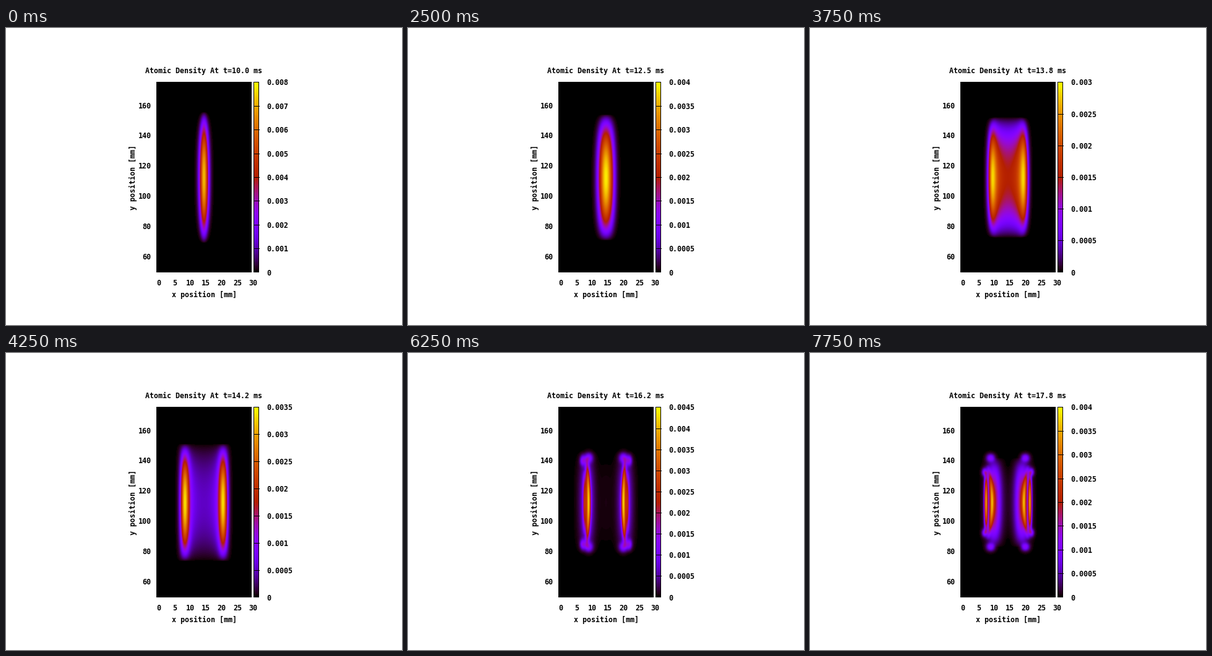
These frames come from a looping animation (640 px wide and 480 px high, 8 s). A matplotlib script:

```python
import numpy as np
import matplotlib.pyplot as plt
from matplotlib.animation import FuncAnimation

W, H = 640, 480
FRAMES, INTERVAL = 32, 250
SPLIT = 17  # step at which the cloud has become two lobes
LEFT, RIGHT, TOP, BOTTOM = 243, 397, 87, 395
MID_X, MID_Y = 319.5, 241.0

plt.rcParams.update({
    "font.family": "DejaVu Sans Mono",
    "font.weight": "bold",
    "font.size": 11.63 * 0.72,
})

# Distances from the centre of the cloud, in pixels
U = np.abs(np.arange(LEFT, RIGHT) - MID_X)[None, :]
V = np.abs(np.arange(TOP, BOTTOM) - MID_Y)[:, None]


def bell(x, width):
    return np.exp(-0.5 * (x / width) ** 2)


def dome(half):
    return np.clip(1 - (V / half) ** 2, 0, None)


def single_cloud(i):
    """Atoms pushed outwards until they pile up at the two walls."""
    s = i / SPLIT
    gain = np.exp(3.1 * s ** 3)
    wall = 24 + 8 * s ** 4
    blur = 3 + 1.7 * s ** 4
    start = np.linspace(-17, 17, 401)
    end = wall * np.tanh(gain * start / wall)
    grid = np.linspace(0, 120, 241)
    across = (bell(start, 4.2) * bell(grid[:, None] - end, blur)).sum(axis=1)

    along = dome(106 - 11 * s ** 2)
    squeeze = np.clip(along, 0.01, 1) ** (0.2 * (1 - s ** 2))
    return np.interp(U / squeeze, grid, across) * along


def split_cloud(q):
    """Two stripes swinging on each side, q steps after the split."""
    settle = np.exp(-q / 2)
    width = 1.9 + 2.7 * settle
    share = 0.48 + 0.14 * np.cos(np.pi * (q - 14) / 6)
    swing = 2 * np.exp(-q / 12) * np.cos(np.pi * q / 4)
    curve = 3 * (q / 14 * V / 40) ** 2

    outer = share * bell(U - 35.5 + swing, width) * dome(52 + 43 * settle)
    inner = ((1 - share) * bell(U - 31 + 0.36 * q - curve, width * 1.2)
             * dome(95 - 2.4 * q))
    body = ((0.6 + 0.006 * q * q) * bell(U - 23 - 8 * np.sin(np.pi * q / 14), 7.5)
            * dome(95 - 1.6 * q))
    halo = (0.35 * settle + 0.005 * q) * bell(U, 10) * dome(95 - 2.5 * q)

    tall = 7 - 0.2 * q
    cap = bell(U - 28, 4.5) * bell(V - 72, tall)
    fin = bell(U - 37.5, 3) * bell(V - 72 + 23 * (q / 14) ** 3, tall)
    return 4.2 * (outer + inner) + body + halo + (1 - settle) * (cap + fin)


def density(i):
    n = single_cloud(i) if i <= SPLIT else split_cloud(i - SPLIT)
    peak = np.interp(i, [0, 6, 13, SPLIT, 21, 25, 31],
                     [7.15, 5.95, 2.36, 3.35, 3.1, 4.2, 3.6])
    return n * peak / n.max()


fig = plt.figure(figsize=(W / 100, H / 100), dpi=100, facecolor="white")
ax = fig.add_axes([0, 0, 1, 1])


def label(x, y, s="", ha="center"):
    return ax.text(x, y + 4.5, s, ha=ha, va="baseline", color="black")


cloud = ax.imshow(np.zeros((V.size, U.size)), cmap="gnuplot",
                  extent=(LEFT, RIGHT, BOTTOM, TOP), interpolation="nearest")
ax.add_patch(plt.Rectangle((400, TOP), 9, BOTTOM - TOP, fc="black", lw=0,
                           antialiased=False))
ax.imshow(np.linspace(1, 0, 306)[:, None], cmap="gnuplot", zorder=2,
          extent=(401, 408, 394, 88), interpolation="nearest")
bar_ticks = ax.hlines([], 400, 409, colors="black", linewidth=0.72,
                      antialiased=False, zorder=3)
bar_labels = [label(421.5, 0, ha="left") for _ in range(11)]

title = label(319.5, 69)
label(320, 430, "x position [mm]")
ax.text(209.5, 241, "y position [mm]", rotation=90, rotation_mode="anchor",
        ha="center", va="baseline", color="black")
for mm in range(0, 31, 5):
    label(247 + mm * 5.08, 411, str(mm))
for mm in range(60, 161, 20):
    label(234.5, 369 - (mm - 60) * 2.44, str(mm), ha="right")

ax.set_xlim(0, W)
ax.set_ylim(H, 0)
ax.set_aspect("auto")
ax.axis("off")


def draw(i):
    n = density(i)
    step = 1.0 if n.max() >= 5 else 0.5
    count = int(np.ceil(n.max() / step - 1e-9))
    cloud.set_data(n)
    cloud.set_clim(0, count * step)
    title.set_text(f"Atomic Density At t={10 + i * 0.25:.1f} ms")

    segments = []
    for k, text in enumerate(bar_labels):
        y = 394.5 - 307 * k / count
        text.set_visible(k <= count)
        text.set_text(f"{k * step / 1000:g}")
        text.set_y(y + 5)
        if 0 < k < count:
            segments.append([(400, y), (409, y)])
    bar_ticks.set_segments(segments)
    return []


anim = FuncAnimation(fig, draw, frames=FRAMES, interval=INTERVAL, repeat=True)
plt.show()
```
